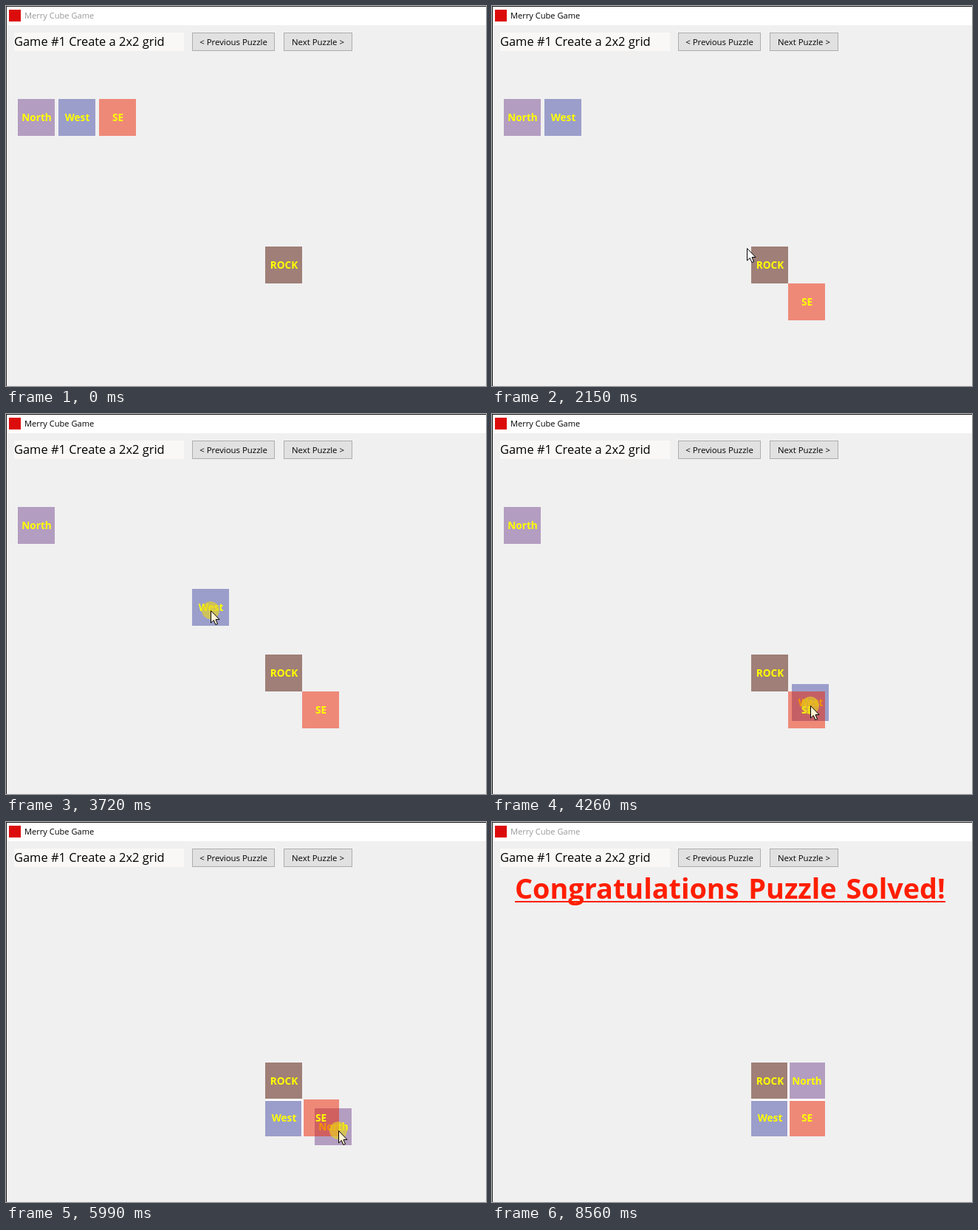
These frames come from a looping animation (650x515 px, 8.65 s). An HTML page with a canvas:

```html
<!DOCTYPE html>
<html lang="en">
<head>
<meta charset="utf-8">
<title>Merry Cube Game</title>
<style>
  html, body { margin: 0; width: 100%; height: 100%; overflow: hidden; background: #f0f0f0; }
  canvas { display: block; }
</style>
</head>
<body>
<canvas id="stage" width="650" height="515"></canvas>
<script>
const ctx = document.getElementById('stage').getContext('2d');
const LOOP = 8650;
const STEP = 77;      // pointer refresh, ms
const LIFT = 0.035;   // how far the hand arcs upward, relative to the distance
const SIZE = 50;
const ROCK = { x: 351, y: 326 };
const SANS = '"Open Sans", "Noto Sans", sans-serif';

// Back to front. Each tile waits in the tray, then snaps to its cell beside the rock.
const TILES = [
  { label: 'North', rgb: '120,76,146', col: 1, row: 0, grab: 5450, drop: 6870 },
  { label: 'West', rgb: '72,78,166', col: 0, row: 1, grab: 3250, drop: 4650 },
  { label: 'SE', rgb: '238,36,2', col: 1, row: 1, grab: 1380, drop: 2080 },
  { label: 'ROCK', rgb: '80,16,0', col: 0, row: 0, grab: 0, drop: 0 }
];
TILES.forEach((tile, i) => {
  tile.tray = { x: 16 + i * (SIZE + 5), y: 126 };
  tile.cell = { x: ROCK.x + tile.col * SIZE, y: ROCK.y + tile.row * SIZE };
});
const [NORTH, , SE] = TILES;

const ENTER = { time: 70, x: 626, y: 495 };
const LEAVE = 8000;
const BLUR = 8560;

const glide = (start, end, x, y) => ({ start, end, x, y });
const ROUTE = [
  glide(180, 1120, 150, 138),
  glide(SE.grab, 2000, 345, 328),
  glide(2400, 3080, 96, 155),
  glide(3250, 4090, 428, 385),
  glide(4090, 4340, 433, 400),
  glide(4650, 5120, 62, 182),
  glide(5120, NORTH.grab, 48, 156),
  glide(NORTH.grab, 5990, 450, 418),
  glide(6170, 6550, 463, 410),
  glide(7280, LEAVE, 590, 515)
];

function pointerAt(t) {
  let at = ENTER;
  for (const move of ROUTE) {
    if (t < move.start) break;
    if (t >= move.end) { at = move; continue; }
    const span = move.end - move.start;
    const steps = Math.round(span / STEP);
    const p = Math.floor(steps * (t - move.start) / span) / steps;
    const dx = move.x - at.x, dy = move.y - at.y;
    const lift = LIFT * Math.hypot(dx, dy) * Math.sin(Math.PI * p);
    return { x: Math.round(at.x + dx * p), y: Math.round(at.y + dy * p - lift) };
  }
  return at;
}

const held = (tile, t) => t >= tile.grab && t < tile.drop;

function tilePlace(tile, t) {
  if (t >= tile.drop) return tile.cell;
  if (!held(tile, t)) return tile.tray;
  const now = pointerAt(t), start = pointerAt(tile.grab);
  return { x: tile.tray.x + now.x - start.x, y: tile.tray.y + now.y - start.y };
}

function box(color, x, y, w, h) {
  ctx.fillStyle = color;
  ctx.fillRect(x, y, w, h);
}

function text(str, x, y, size, color, weight = 400, align = 'left') {
  ctx.font = `${weight} ${size}px ${SANS}`;
  ctx.textAlign = align;
  ctx.fillStyle = color;
  ctx.fillText(str, x, y);
}

function button(label, x, w) {
  box('#adadad', x, 36, w, 25);
  box('#e1e1e1', x + 1, 37, w - 2, 23);
  text(label, x + w / 2, 53, 11.4, '#000', 400, 'center');
}

function drawWindow(active) {
  box('#f0f0f0', 0, 0, 650, 515);
  box('#fff', 0, 0, 650, 26);
  const edge = active ? '#161616' : '#2b2b2b';
  box(edge, 0, 0, 650, 1);
  box(edge, 0, 0, 1, 515);
  box('#dc0c0c', 4, 5, 16, 16);
  text('Merry Cube Game', 25, 17, 11.1, active ? '#000' : '#999');
  box('#f9f8f6', 11, 36, 230, 25);
  text('Game #1 Create a 2x2 grid', 11, 54, 16.45, '#000');
  button('< Previous Puzzle', 252, 112);
  button('Next Puzzle >', 376, 93);
}

function drawTile(tile, t) {
  const { x, y } = tilePlace(tile, t);
  box(`rgba(${tile.rgb},0.5)`, x, y, SIZE, SIZE);
  text(tile.label, x + 25.5, y + 30, 13.6, '#ff0', 700, 'center');
}

// White lines where snapped tiles share an edge
function drawSeams(t) {
  const placed = TILES.filter(tile => t >= tile.drop);
  for (const a of placed) {
    for (const b of placed) {
      const { x, y } = b.cell;
      const right = b.col - a.col, down = b.row - a.row;
      if (right === 1 && down === 0) box('#fff', x - 1, y, 3, SIZE);
      if (right === 0 && down === 1) box('#fff', x, y - 1, SIZE, 3);
    }
  }
}

function drawBanner() {
  const str = 'Congratulations Puzzle Solved!';
  ctx.wordSpacing = '3px';
  text(str, 31, 104, 37.8, '#ff1e00', 700);
  ctx.fillRect(31, 107, Math.round(ctx.measureText(str).width), 2);
  ctx.wordSpacing = '0px';
}

function drawPointer(t) {
  const { x, y } = pointerAt(t);
  const pressed = TILES.some(tile => held(tile, t));
  if (pressed) {
    ctx.fillStyle = 'rgba(232,212,32,0.65)';
    ctx.beginPath();
    ctx.arc(x, y, 12, 0, Math.PI * 2);
    ctx.fill();
  }
  ctx.save();
  ctx.translate(x + 0.5, y + 0.5);
  const arrow = new Path2D('M0 0V16.5L3.8 13 6.4 19 9 18 6.5 12H11.5Z');
  ctx.fillStyle = pressed ? '#fff3d4' : '#fff';
  ctx.fill(arrow);
  ctx.strokeStyle = '#000';
  ctx.lineWidth = 1;
  ctx.stroke(arrow);
  ctx.restore();
}

function draw(t) {
  drawWindow(t >= SE.grab && t < BLUR);
  TILES.forEach(tile => drawTile(tile, t));
  drawSeams(t);
  if (t >= NORTH.drop) drawBanner();
  if (t >= ENTER.time && t < LEAVE) drawPointer(t);
}

const begin = performance.now();
function tick() {
  draw((performance.now() - begin) % LOOP);
  requestAnimationFrame(tick);
}
tick();
</script>
</body>
</html>
```
